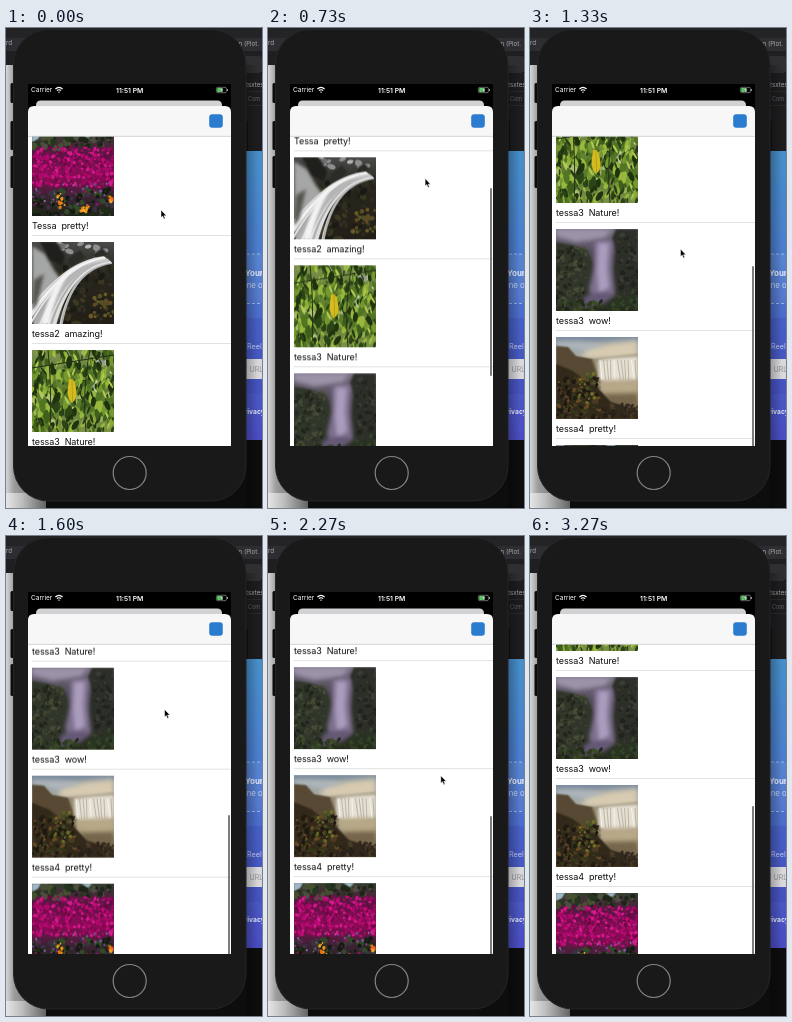
These frames come from a looping animation (256 px wide and 480 px high, 3340 ms). An HTML page with a canvas:

```html
<!DOCTYPE html>
<html lang="en">
<head>
<meta charset="utf-8">
<title>Photo feed</title>
<style>
  html, body { margin: 0; width: 100%; height: 100%; overflow: hidden; background: #161617; }
  #stage { position: relative; width: 256px; height: 480px; overflow: hidden; font-family: Inter, Roboto, sans-serif; }
  #stage > svg { position: absolute; left: 0; top: 0; }
  #list { position: absolute; left: 22px; top: 108px; width: 203px; height: 310px; overflow: hidden; background: #fff; }
  #rows { position: absolute; left: 0; top: -2px; width: 100%; will-change: transform; }
  .row { position: absolute; left: 4px; right: 0; height: 108px; }
  .row canvas { position: absolute; left: 0; top: 0; width: 82px; height: 82px; }
  .row p { position: absolute; left: 0; top: 86px; margin: 0; font-size: 9px; line-height: 12px; letter-spacing: -.08px; white-space: pre; color: #0b0b0b; }
  .row i { position: absolute; left: 0; right: 0; top: 101px; height: 1px; background: #e2e2e3; }
  #bar { position: absolute; left: 200.2px; width: 1.8px; height: 188px; border-radius: 1px; background: #7d7d7f; }
  #cursor { position: absolute; left: 0; top: 0; width: 8px; height: 11px; overflow: visible; }
</style>
</head>
<body>
<div id="stage">
  <svg width="256" height="480" viewBox="0 0 256 480">
    <defs>
      <linearGradient id="web" x2="0" y2="1">
        <stop offset="0" stop-color="#468fca"/><stop offset=".35" stop-color="#4b7dce"/>
        <stop offset="1" stop-color="#4a4cc2"/>
      </linearGradient>
      <linearGradient id="page">
        <stop offset="0" stop-color="#d6d6d6"/><stop offset=".2" stop-color="#9c9c9c"/>
        <stop offset="1" stop-color="#5c5c5c"/>
      </linearGradient>
      <linearGradient id="foot">
        <stop offset="0" stop-color="#e6e6e6"/><stop offset=".4" stop-color="#bdbdbd"/>
        <stop offset="1" stop-color="#646464"/>
      </linearGradient>
      <linearGradient id="shadow">
        <stop offset="0" stop-color="#000" stop-opacity=".28"/><stop offset="1" stop-color="#000" stop-opacity="0"/>
      </linearGradient>
    </defs>
    <rect width="256" height="480" fill="#0d0d0e"/>
    <rect width="256" height="10" fill="#242427"/>
    <rect y="10" width="256" height="13" fill="#2e2e32"/>
    <rect y="23" width="256" height="14" fill="#1f1f21"/>
    <rect y="37" width="40" height="428" fill="url(#page)"/>
    <path d="M0 465H40V480H0z" fill="url(#foot)"/>
    <rect x="236" y="28" width="20" height="17" rx="3" fill="#2f2f31"/>
    <rect x="236" y="45" width="20" height="78" fill="#1d1d1f"/>
    <path d="M236 63.5H256M236 77.5H256" stroke="#313133" stroke-width=".7"/>
    <rect x="236" y="123" width="20" height="289" fill="url(#web)"/>
    <rect x="236" y="226" width="20" height="49" fill="#fff" opacity=".06"/>
    <rect x="236" y="290" width="20" height="76" fill="#3b3fae" opacity=".25"/>
    <path d="M236 226H256M236 275.5H256" stroke="#a9c4ee" stroke-width=".8" stroke-dasharray="3 2"/>
    <rect x="236" y="331" width="20" height="20" fill="#d9d9dc"/>
    <g fill="#a9a9ab" font-size="6.2">
      <text x="-3.500" y="17">ard</text>
      <text x="232.500" y="18">n (Plot.</text>
      <text x="236.500" y="58.500">atsxtes</text>
      <text x="242" y="72.500" font-size="5.500" fill="#626265">Com</text>
    </g>
    <g fill="#e6ecfa">
      <text x="239" y="247.500" font-size="8" font-weight="700">Your</text>
      <text x="236" y="260" font-size="7.800" fill="#c3d3f2">one o</text>
      <text x="241" y="321" font-size="7.300" fill="#c0c8f0">Reelo</text>
      <text x="237.500" y="343.500" font-size="7" fill="#929296">F URL</text>
      <text x="238.500" y="385.500" font-size="6.700" font-weight="700">rivacy</text>
    </g>
    <rect x="240" y="37" width="12" height="443" fill="url(#shadow)"/>

    <g fill="#0c0c0d">
      <rect x="4.500" y="55" width="6" height="20" rx="1.500"/>
      <rect x="4.500" y="93" width="6" height="29" rx="1.500"/>
      <rect x="4.500" y="128" width="6" height="32" rx="1.500"/>
      <rect x="237" y="93" width="5" height="30" rx="1.500"/>
    </g>
    <rect x="7.500" y="1.500" width="232.500" height="471.500" rx="35" fill="#19191a" stroke="#252527"/>
    <circle cx="123.700" cy="445" r="16.500" fill="#191919" stroke="#858585" stroke-width="1.200"/>
    <rect x="22" y="56" width="203" height="362" fill="#000"/>
    <path d="M30 79V77.500Q30 72.500 35 72.500H211Q216 72.500 216 77.500V79z" fill="#d2d2d4"/>
    <path d="M22 109V84Q22 78 28 78H219Q225 78 225 84V109z" fill="#f7f7f8"/>
    <rect x="203.200" y="86.200" width="13.600" height="13.600" rx="3" fill="#2b7bce"/>
    <g fill="#fff" font-size="6.500">
      <text x="25" y="64.400">Carrier</text>
      <text x="123.700" y="64.500" text-anchor="middle" font-size="6.800" font-weight="600">11:51 PM</text>
    </g>
    <g fill="none" stroke="#fff" stroke-width="1.100">
      <path d="M49.400 61Q53 57.600 56.600 61M50.900 62.700Q53 60.800 55.100 62.700"/>
      <path d="M53 65L51.900 63.700H54.100z" fill="#fff" stroke="none"/>
    </g>
    <rect x="210.400" y="59.300" width="10" height="5.400" rx="1.300" fill="none" stroke="#aaa" stroke-width=".6"/>
    <rect x="211.200" y="60.100" width="5.600" height="3.800" rx=".6" fill="#54d763"/>
    <path d="M216 59L213.500 62.300H215.200L214.700 65L217.400 61.500H215.700z" fill="#fff" stroke="#000" stroke-width=".3"/>
    <path d="M221.500 61V63" stroke="#aaa" stroke-width=".9"/>
  </svg>

  <div id="list">
    <div id="rows"></div>
    <div id="bar"></div>
  </div>
  <svg width="256" height="480"><path d="M22 108.400H225" stroke="#cbcbcd" stroke-width=".8"/></svg>
  <svg id="cursor" viewBox="0 0 8 11">
    <path d="M0 0V7.600L1.700 6.100L2.900 9L4.200 8.400L3 5.700H5.400z" fill="#000" stroke="#fff" stroke-width=".5"/>
  </svg>
</div>

<script>
const LOOP = 3340, STEP = 66.8, PITCH = 108, END = 289;
const byId = id => document.getElementById(id);

function seeded(seed) {
  return () => (seed = (seed * 16807) % 2147483647) / 2147483647;
}

function painter(c) {
  const p = {
    shade(...stops) {
      const g = c.createLinearGradient(0, 0, 0, 82);
      stops.forEach((s, i) => g.addColorStop(i / (stops.length - 1), s));
      c.fillStyle = g;
      c.fillRect(0, 0, 82, 82);
    },
    shape(color, d, blur = 0) {
      c.filter = blur ? `blur(${blur * 2}px)` : 'none';
      c.fillStyle = color;
      c.fill(new Path2D(d));
      c.filter = 'none';
    },
    line(color, d, width) {
      c.strokeStyle = color;
      c.lineWidth = width;
      c.stroke(new Path2D(d));
    },
    blob(color, x, y, rx, ry = rx, turn = 0) {
      c.fillStyle = color;
      c.beginPath();
      c.ellipse(x, y, rx, ry, turn, 0, 7);
      c.fill();
    },
    // scatter n blobs in a box, cycling at random through the colours
    strew(rnd, n, colors, x, y, w, h, size, flat = 1, spin = 3) {
      for (let i = 0; i < n; i++) {
        const r = size * (.5 + rnd());
        p.blob(colors[Math.floor(rnd() * colors.length)], x + rnd() * w, y + rnd() * h, r, r * flat, (rnd() - .5) * spin);
      }
    }
  };
  return p;
}

const photos = {
  flowers(p, r) {
    p.shade('#33402f', '#5d1445', '#8b0b57', '#3d2335', '#1d2719');
    p.strew(r, 60, ['#26351f', '#43512f', '#4d4f40', '#1c2618'], 0, 2, 82, 12, 2.5);
    p.shape('#9fb6cb', 'M0 0H9L6 5L0 8zM49 0H60L56 4z', .5);
    p.strew(r, 380, ['#c30b78', '#a8086a', '#d41b8b', '#6d0643', '#b30a6d', '#8d0857'], 0, 13, 82, 40, 1.7, .7);
    p.strew(r, 150, ['#1d2b17', '#34482a', '#141a13', '#3c3140'], 0, 55, 82, 27, 2);
    p.strew(r, 40, ['#7d4f9e', '#8d68a8', '#8d155c'], 0, 49, 82, 22, 1.1);
    for (const [x, y] of [[27, 62], [30, 70], [56, 74], [78, 64], [50, 73]])
      p.strew(r, 6, ['#f0941b', '#e87310', '#f0ab30'], x - 3, y - 3, 6, 7, 1.3);
  },
  stream(p, r) {
    p.shade('#4a4a48', '#2b2a22', '#25231a', '#211f17');
    p.strew(r, 90, ['#1a1a15', '#322f22', '#3a3820', '#262419'], 28, 22, 54, 60, 3, .7);
    p.strew(r, 24, ['#4f5024', '#5e4a24', '#6a5a28'], 58, 52, 24, 24, 1.8);
    p.shape('#a5a6a6', 'M0 4L13 12L22 28L34 44L24 82H0z', 1.5);
    p.strew(r, 16, ['#8d8f90', '#b3b5b5', '#6f7170'], 24, 1, 50, 13, 4, .6, 1);
    p.shape('#1f1f1c', 'M8 0H25L33 14L30 24L18 18z', 1);
    p.shape('#2b2b28', 'M36 17L48 8L53 15L38 27zM59 14L70 6L76 12L66 17z', .8);
    for (let i = 0; i < 34; i++) {
      const k = r(), tone = 170 + Math.floor(r() * 80);
      p.line(`rgb(${tone},${tone},${tone})`, `M${80 - 8 * k} ${21 - 6 * k}Q${40 - 10 * k} ${27 - 8 * k} ${30 - 44 * k} 82`, 1.8);
    }
    p.shape('#f3f3f3', 'M76 18Q47 21 37 32Q23 51 17 82H9Q18 47 33 31Q47 19 76 17z', 1);
    p.shape('#55564f', 'M2 38L12 32L5 62L0 69z', 1.5);
  },
  leaves(p, r) {
    p.shade('#7e9052', '#668437', '#5c7c2d', '#7d9149');
    p.strew(r, 24, ['#a9b5a0', '#8f9b94', '#c3cda4'], 30, 0, 52, 45, 3);
    p.strew(r, 25, ['#aebf74', '#9ab158'], 0, 40, 82, 42, 3);
    p.strew(r, 260, ['#2c4517', '#527524', '#20330f', '#75972f', '#98b83d', '#405f1d'], 0, 0, 82, 82, 2.2, 2.1, 1.2);
    p.strew(r, 90, ['#b2c955', '#88aa39', '#27391a'], 0, 0, 82, 82, .9, 4, 1.4);
    p.line('#26331a', 'M16 0Q20 40 18 82M58 0Q50 40 54 82M0 18L82 5', 1);
    p.shape('#d6bb20', 'M37 29Q43 27 44 39Q46 48 40 53Q34 46 36 37z');
    p.line('#ad9519', 'M40 29L40.500 53', .7);
  },
  gorge(p, r) {
    p.shade('#7d7489', '#4b4650', '#35362f', '#262d1e');
    p.shape('#9c93a9', 'M0 0H55L49 9L20 13L0 7z', 2);
    p.shape('#30362a', 'M0 13L16 16L31 21L37 34L35 56L40 69L24 82H0z', 1);
    p.shape('#2d2f29', 'M60 0H82V75L61 62L57 46L59 23L56 9z', 1);
    p.strew(r, 100, ['#252c1f', '#3e4631', '#1f231b', '#474a36'], 0, 18, 32, 62, 2.2, .6);
    p.strew(r, 70, ['#20231e', '#3b3d35', '#2b2f28'], 62, 5, 20, 60, 2.2, .7);
    p.shape('#7e7190', 'M38 13Q48 9 57 13L56 38L59 66L37 73L33 60L38 39z', 2);
    p.shape('#aa9dbd', 'M42 14H53L51 38L53 58L43 66L41 44z', 2);
    p.shape('#655876', 'M28 68Q43 60 58 66L48 75L28 79z', 2);
    p.strew(r, 50, ['#2f3d20', '#3c4b28', '#222b1a'], 0, 72, 82, 10, 2.5, .6);
    p.strew(r, 25, ['#34432a', '#293521'], 60, 62, 22, 18, 2.5, .6);
  },
  falls(p, r) {
    p.shade('#7b8da0', '#bfb7a5', '#a79a80', '#6d5d43');
    p.shape('#d8cbb1', 'M30 9L82 3V22H26z', 3);
    p.shape('#aeb6ba', 'M0 5Q30 3 50 9L26 14L0 9z', 2);
    p.shape('#574934', 'M0 9L12 10L20 19L37 22L45 33L45 52H0z', .8);
    p.shape('#958a72', 'M36 22L82 17V42H43z', 1);
    p.shape('#e5e0d4', 'M42 23L56 21L82 19V42Q60 48 43 43z', 1.5);
    for (let x = 44; x < 82; x += 3.5)
      p.line(r() < .5 ? '#f6f3ea' : '#bdb5a3', `M${x} 23L${x + r() * 3} 43`, 1);
    p.shape('#b7a888', 'M39 46Q62 41 82 44V63L55 60z', 2);
    p.shape('#75664c', 'M48 57L82 56V82H60z', 2);
    p.shape('#33291b', 'M0 27L17 34L31 45L42 51L55 65L82 73V82H0z', .8);
    p.strew(r, 170, ['#211c13', '#4b3a21', '#343719', '#1c1811', '#644a25'], 0, 40, 43, 42, 1.9, .7);
    p.strew(r, 45, ['#28211a', '#493b28', '#362c1e'], 42, 68, 40, 14, 2, .6);
    p.strew(r, 28, ['#56631f', '#6f6f29', '#414f1c'], 22, 35, 17, 32, 1.3);
  }
};

function photo(kind) {
  const cv = document.createElement('canvas');
  cv.width = cv.height = 164;
  const c = cv.getContext('2d');
  c.scale(2, 2);
  photos[kind](painter(c), seeded(4711));
  return cv;
}

[['flowers', 'Tessa  pretty!'], ['stream', 'tessa2  amazing!'], ['leaves', 'tessa3  Nature!'],
 ['gorge', 'tessa3  wow!'], ['falls', 'tessa4  pretty!'], ['flowers', 'Tessa  pretty!']]
.forEach(([kind, label], i) => {
  const row = document.createElement('div');
  row.className = 'row';
  row.style.top = i * PITCH + 'px';
  const p = document.createElement('p');
  p.textContent = label;
  row.append(photo(kind), p, document.createElement('i'));
  byId('rows').append(row);
});

// [ms, value...]
const scroll = [[0, 0], [400, 0], [530, 8.6], [640, 48], [740, 88], [860, 118], [1000, 132.5], [1080, 135],
  [1330, 229], [1430, 273], [1530, 301], [1680, 294], [1870, 290], [2130, 289], [2250, 297],
  [2400, 312], [2500, 304], [2600, 297], [2800, 291], [3000, 289.3], [3270, 289], [3340, 289]];
const pointer = [[0, 155, 182], [400, 162, 237], [530, 161.5, 228.5], [740, 157, 150], [1000, 155, 295],
  [1080, 154, 315], [1330, 150.5, 221], [1480, 155, 168], [1870, 165.5, 208], [2130, 169, 268],
  [2400, 180, 205], [2550, 262, 190], [3340, 262, 190]];

// monotone cubic through the keys, without overshoot
function sample(keys, t, col = 1) {
  let i = 0;
  while (i < keys.length - 2 && t >= keys[i + 1][0]) i++;
  const slope = j => keys[j] && keys[j + 1]
    ? (keys[j + 1][col] - keys[j][col]) / (keys[j + 1][0] - keys[j][0]) : 0;
  const tangent = j => {
    const a = slope(j - 1), b = slope(j);
    return a * b > 0 ? 2 * a * b / (a + b) : 0;
  };
  const [a, b] = [keys[i], keys[i + 1]], w = b[0] - a[0], u = (t - a[0]) / w, v = 1 - u;
  return a[col] * v * v * (1 + 2 * u) + b[col] * u * u * (3 - 2 * u)
    + w * u * v * (tangent(i) * v - tangent(i + 1) * u);
}

function draw(ms) {
  const tick = Math.floor(ms / 10) * 10;
  const t = Math.floor(Math.floor((tick + 9.99) / STEP) * STEP / 10) * 10;
  const y = sample(scroll, t);
  byId('rows').style.transform = `translateY(${-y}px)`;
  byId('bar').style.top = 6.4 + .54 * y + .4 * Math.max(0, y - END) + 'px';
  byId('bar').style.opacity = y > .1 ? 1 : 0;
  byId('cursor').style.transform = `translate(${sample(pointer, t, 1)}px, ${sample(pointer, t, 2)}px)`;
}

const start = performance.now();
function frame() {
  draw((performance.now() - start) % LOOP);
  requestAnimationFrame(frame);
}
draw(0);
requestAnimationFrame(frame);
</script>
</body>
</html>
```
